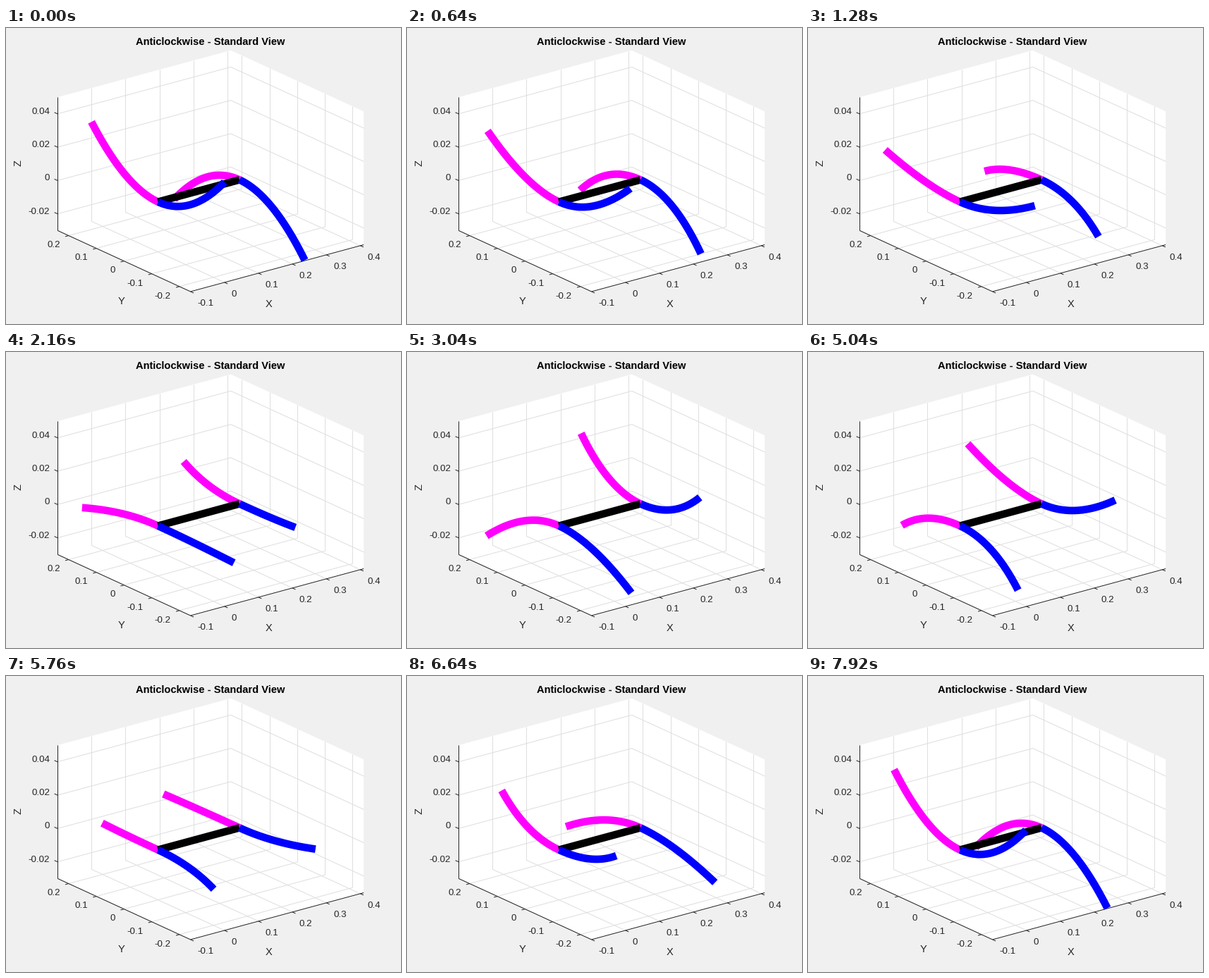
A matplotlib script that plays this animation: 560x420 px, repeating every 8000 ms.

```python
import numpy as np
import matplotlib.pyplot as plt
from matplotlib.animation import FuncAnimation

W, H, DPI = 560, 420, 100
FRAMES, INTERVAL = 100, 80
PT = 72 / DPI  # points per pixel

X0, X1 = -0.1, 0.41
Y0, Y1 = -0.24, 0.24
Z0, Z1 = -0.03, 0.05
INK = "#262626"
GRID = "#dedede"

BODY = 0.24     # body length along X
REACH = 0.238   # sideways reach of a leg
SWING = 0.03    # fore-aft amplitude at the tip
LIFT = 0.03     # vertical amplitude at the tip

# Axes rectangle on the stage, filled by the box seen from this direction
LEFT, BOTTOM, WIDTH, HEIGHT = 72.6, 373.5, 434, 342.3
AZ, EL = np.radians(37.5), np.radians(30)
ACROSS = np.array([np.cos(AZ), np.sin(AZ)])
UP = np.array([np.sin(AZ) * np.sin(EL), np.cos(AZ) * np.sin(EL), np.cos(EL)])
ACROSS *= WIDTH / ACROSS.sum()
UP *= HEIGHT / UP.sum()

plt.rcParams["font.family"] = "Liberation Sans"
fig = plt.figure(figsize=(W / DPI, H / DPI), dpi=DPI, facecolor="#f0f0f0")
ax = fig.add_axes([0, 0, 1, 1])
ax.set_xlim(-0.5, W - 0.5)
ax.set_ylim(H - 0.5, -0.5)
ax.axis("off")


def project(x, y, z):
    """Orthographic view of a data point, in stage pixels."""
    u = (x - X0) / (X1 - X0)
    v = (y - Y0) / (Y1 - Y0)
    w = (z - Z0) / (Z1 - Z0)
    return (LEFT + ACROSS[0] * u + ACROSS[1] * (1 - v),
            BOTTOM - UP[0] * u - UP[1] * v - UP[2] * w)


def segment(*points, color=GRID, width=1.0, order=1):
    """Separate straight pieces, so that upright ones stay crisp."""
    for a, b in zip(points, points[1:]):
        (xa, ya), (xb, yb) = project(*a), project(*b)
        ax.plot([xa, xb], [ya, yb], color=color, lw=width * PT, zorder=order,
                solid_capstyle="butt")


def tick(x, y, dx, dy):
    ax.plot([x, x + dx], [y, y + dy], color=INK, lw=PT, zorder=2,
            solid_capstyle="butt")


def label(x, y, text, size=13.33, ha="center", color=INK, **kw):
    """Text whose capitals are centred on height y."""
    ax.text(x, y + 0.36 * size, text, fontsize=size * PT, ha=ha,
            va="baseline", color=color, zorder=3, **kw)


def draw_axes():
    hull = [(X0, Y1, Z1), (X1, Y1, Z1), (X1, Y0, Z1),
            (X1, Y0, Z0), (X0, Y0, Z0), (X0, Y1, Z0)]
    ax.fill(*zip(*[project(*p) for p in hull]), color="white", lw=0, zorder=0)

    for i in range(-1, 5):
        v = i / 10
        segment((v, Y0, Z0), (v, Y1, Z0), (v, Y1, Z1))
        x, y = project(v, Y0, Z0)
        tick(x, y, 4.5, 2)
        label(x + 10, y + 15, f"{v:g}", ha="left")
    for i in range(-2, 3):
        v = i / 10
        segment((X0, v, Z0), (X1, v, Z0), (X1, v, Z1))
        x, y = project(X0, v, Z0)
        tick(x, y, -4.8, 1.3)
        label(x - 12, y + 12, f"{v:g}", ha="right")
    for i in range(-1, 3):
        v = i / 50
        segment((X0, Y1, v), (X1, Y1, v), (X1, Y0, v))
        x, y = project(X0, Y1, v)
        tick(x, y, -4.5, -2)
        label(x - 11, y - 5, f"{v:g}", ha="right")

    segment((X0, Y1, Z1), (X0, Y1, Z0), (X0, Y0, Z0), (X1, Y0, Z0),
            color=INK, order=2)
    label(372.3, 390.5, "X", 14.67)
    label(163, 386, "Y", 14.67)
    ax.text(17.5, 191, "Z", fontsize=14.67 * PT, rotation=90,
            ha="center", va="center", color=INK)
    label(289.5, 18.2, "Anticlockwise - Standard View", 14.67, color="black",
          weight="bold")


def leg(hip, side, theta):
    """Leg bent as a parabola; the two hips move in antiphase."""
    s = np.linspace(0, 1, 40)
    phase = 1 if hip == 0 else -1
    return project(hip - side * phase * SWING * np.sin(theta) * s**2,
                   side * REACH * s,
                   phase * LIFT * np.cos(theta) * s**2)


draw_axes()
THICK = 10.67
segment((0, 0, 0), (BODY, 0, 0), color="black", width=THICK, order=6)

legs = []
for hip in (0, BODY):
    for side, color, order in ((1, "#ff00ff", 5), (-1, "#0000ff", 7)):
        line, = ax.plot([], [], color=color, lw=THICK * PT, zorder=order,
                        solid_capstyle="butt")
        legs.append((line, hip, side))


def update(frame):
    theta = 2 * np.pi * (frame + 1) / FRAMES
    for line, hip, side in legs:
        line.set_data(*leg(hip, side, theta))
    return [line for line, _, _ in legs]


anim = FuncAnimation(fig, update, frames=FRAMES, interval=INTERVAL,
                     repeat=True, repeat_delay=0)
plt.show()
```
